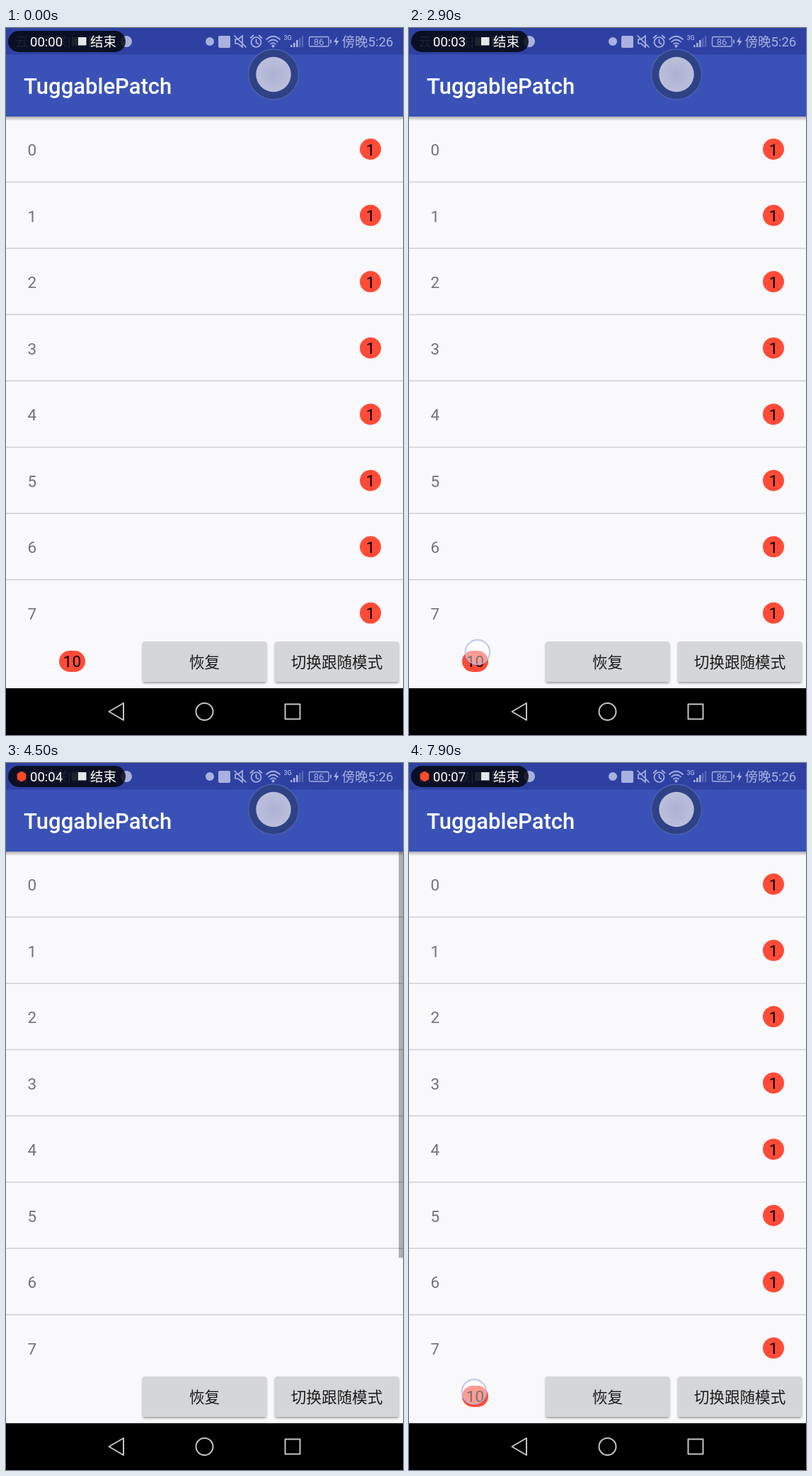
Recreate the animation shown at these times as an HTML page. Size 561 px wide and 998 px high, loop 8000 ms.

```html
<!DOCTYPE html>
<html lang="zh">
<head>
<meta charset="utf-8">
<title>TuggablePatch</title>
<style>
html, body { margin: 0; width: 100%; height: 100%; overflow: hidden; background: #000; }
svg { display: block; width: 561px; height: 998px; }
text { font-family: Roboto, "Noto Sans CJK SC", "Noto Sans CJK", sans-serif; }
.mid { text-anchor: middle; }
.num { font-size: 22.5px; }
.btn { font-size: 21.6px; font-weight: 500; fill: #1b1b1c; text-anchor: middle; }
.line { fill: none; stroke: #a8b1df; stroke-width: 1.7; stroke-linecap: round; }
.bar { font-size: 18.5px; }
.nav { fill: none; stroke: #c4c4c4; stroke-width: 2; stroke-linejoin: round; }
</style>
</head>
<body>
<svg viewBox="0 0 561 998">
  <defs>
    <linearGradient id="shade" x2="0" y2="1">
      <stop offset="0" stop-color="#000" stop-opacity=".3"/>
      <stop offset="1" stop-color="#000" stop-opacity="0"/>
    </linearGradient>
    <radialGradient id="ball">
      <stop offset="0" stop-color="#adb2d3"/>
      <stop offset="1" stop-color="#bbbfdb"/>
    </radialGradient>
    <filter id="lift" x="-5%" y="-10%" width="110%" height="130%">
      <feDropShadow dx="0" dy="2" stdDeviation="1.5" flood-color="#000" flood-opacity=".35"/>
    </filter>
  </defs>

  <rect width="561" height="932" fill="#f9f8fa"/>
  <g id="rows"></g>
  <g id="marks"></g>
  <rect id="scroll" x="555" y="125" width="6" height="573.5" fill="#000" opacity="0"/>

  <g fill="#d5d6d7">
    <rect x="193" y="866" width="175" height="57" rx="3" filter="url(#lift)"/>
    <rect x="380" y="866" width="175" height="57" rx="3" filter="url(#lift)"/>
  </g>
  <rect id="dimReset" x="193" y="866" width="175" height="57" rx="3" opacity="0"/>
  <rect id="dimMode" x="380" y="866" width="175" height="57" rx="3" opacity="0"/>
  <text class="btn" x="280.5" y="903">恢复</text>
  <text class="btn" x="467.5" y="903">切换跟随模式</text>

  <rect y="125" width="561" height="6" fill="url(#shade)"/>
  <rect y="37" width="561" height="88" fill="#3a52b7"/>
  <rect width="561" height="37.5" fill="#2e41a2"/>
  <text x="25" y="93" font-size="31" font-weight="500" fill="#fff">TuggablePatch</text>

  <g fill="#a8b1df">
    <text class="bar" x="13" y="26">云禾讯联|</text>
    <rect x="93" y="13" width="11" height="12"/>
    <rect x="117" y="12" width="17" height="14"/>
    <circle cx="170" cy="19" r="8"/>
    <circle cx="288" cy="19" r="6"/>
    <rect x="300" y="11" width="17" height="17" rx="2"/>
    <path d="M402 27v-3h2.6v3zM406 27v-6h2.6v6zM410 27v-10h2.6v10z"/>
    <path d="M414 27v-13h2.4v13zM418 27v-16h2.2v16z" opacity=".35"/>
    <path d="M468 12l-5 8h3.4l-1 6 5-8h-3.4z"/>
    <text x="392.5" y="17" font-size="9" font-weight="500">3G</text>
    <text class="mid" x="442" y="24" font-size="13">86</text>
    <text class="bar" x="474.5" y="26">傍晚5:26</text>
    <circle cx="377.500" cy="25.500" r="2"/>
  </g>
  <g class="line">
    <path d="M324 16h4l6-5v16l-6-5h-4zM323 11l16 16"/>
    <circle cx="353.5" cy="20" r="7"/>
    <path d="M353.500 16v4.500l3 2M345.500 14l4-3.500M361.500 14l-4-3.500"/>
    <path d="M368 16q9.500-8.500 19 0M371 19.500q6.500-6 13 0M374 22.700q3.500-3 7 0"/>
    <rect x="428.500" y="12.500" width="27.500" height="13.500" rx="1.500" stroke-width="1.300"/>
    <path d="M459 17v4"/>
  </g>

  <rect x="3" y="4" width="166" height="30" rx="15" fill="#04060c" opacity=".84"/>
  <path id="dot" d="M22 11.500l6.300 3.700v7.600l-6.300 3.700l-6.300-3.700v-7.600z" fill="#ff4a2b"/>
  <text id="clock" class="bar" x="34" y="26" fill="#fff">00:00</text>
  <rect x="102" y="13" width="11.500" height="11.500" fill="#e6e6e8"/>
  <text class="bar" x="119" y="26" fill="#fff">结束</text>

  <circle cx="378" cy="65.500" r="35.500" fill="#2f4286" stroke="#4a60b2" stroke-width="1.500"/>
  <circle cx="378" cy="65.500" r="24.700" fill="url(#ball)"/>

  <rect y="932" width="561" height="66"/>
  <g class="nav">
    <path d="M145.500 965l20.500-12v24z"/>
    <circle cx="280.500" cy="965" r="12"/>
    <rect x="394.500" y="954.500" width="21" height="21"/>
  </g>

  <path id="rope" fill="#ff4b38"/>
  <g id="badge">
    <rect x="-18.500" y="-15" width="37" height="30" rx="15" fill="#ff4b38"/>
    <text class="num mid" y="8">10</text>
  </g>
  <circle id="touch" r="17.300" fill="#fff" fill-opacity=".45" stroke="#aeb9e6" stroke-opacity=".8" stroke-width="2"/>
</svg>
<script>
const $ = id => document.getElementById(id);
const set = (id, attrs) => {
  for (const k in attrs) $(id).setAttribute(k, attrs[k]);
};

const HOME = [93.5, 894];
const RESET = [281, 897], MODE = [487, 897];
const TICKS = [900, 2100, 2900, 4000, 4900, 6200, 7300];
const DOT_ON = [400, 1400, 2500, 3300, 4400, 5500, 6600, 7700];

// Each key is [time, ...values].
const DRAG = [
  [1200, ...HOME], [1400, 105, 876], [1600, 126, 842], [1800, 148, 815], [1900, 170, 811],
  [2000, 160, 822], [2100, 86, 903], [2200, 96, 891], [2300, ...HOME],
  [2900, ...HOME], [3100, 118, 862], [3400, 228, 716], [3700, 348, 562], [3900, 370, 537]
];
const SCROLL = [[4200, 0], [4300, .3], [7500, .3], [7700, 0]];
const DIM_RESET = [[5500, 0], [5700, .1], [5900, .1], [6100, .07], [6300, 0]];
const DIM_MODE = [
  [2200, 0], [2300, .1], [2400, .1], [2600, 0],
  [6500, 0], [6600, .1], [6800, .1], [7100, .01], [7200, 0]
];
// [down, up, fixed point]; without a point the touch follows the badge.
const TOUCHES = [
  [1200, 1900], [2300, 2400, MODE], [2900, 4100],
  [5600, 5800, RESET], [6500, 6700, MODE], [7800, 8000]
];

const between = (t, a, b) => t >= a && t < b;

function at(keys, t) {
  const i = keys.findIndex(k => k[0] > t);
  if (i < 0) return keys[keys.length - 1].slice(1);
  if (i === 0) return keys[0].slice(1);
  const [a, b] = [keys[i - 1], keys[i]];
  const p = (t - a[0]) / (b[0] - a[0]);
  return a.slice(1).map((v, j) => v + (b[j + 1] - v) * p);
}

const badgeAt = t => t < 4200 ? at(DRAG, t) : HOME;

function ropePath([x, y]) {
  const [hx, hy] = HOME;
  const dx = x - hx, dy = y - hy, d = Math.hypot(dx, dy);
  if (d < 1) return "";
  const r = 15 - d * .06, R = 15;
  const nx = -dy / d, ny = dx / d;
  const p = (cx, cy, k) => `${cx + nx * k} ${cy + ny * k}`;
  const mx = (x + hx) / 2, my = (y + hy) / 2;
  return `M${p(hx, hy, r)}Q${p(mx, my, 2.5)} ${p(x, y, R)}` +
    `L${p(x, y, -R)}Q${p(mx, my, -2.5)} ${p(hx, hy, -r)}` +
    `A${r} ${r} 0 0 1 ${p(hx, hy, r)}Z`;
}

function drawTouch(t) {
  const hit = TOUCHES.find(([a, b]) => between(t, a, b + 200));
  if (!hit) return set("touch", { opacity: 0 });
  const [, up, spot] = hit;
  const [x, y] = spot || badgeAt(Math.min(t, up - 60) + 40).map((v, i) => v - [1.5, 6.5][i]);
  set("touch", { cx: x, cy: y, opacity: t <= up ? 1 : .4 });
}

function draw(ms) {
  const t = Math.floor(ms % 8000 / 100) * 100;
  const sec = TICKS.filter(k => k <= t).length;
  const lastTick = sec ? TICKS[sec - 1] : 0;
  $("clock").textContent = "00:0" + sec;
  set("dot", { opacity: DOT_ON.some(k => k <= t && k >= lastTick) ? 1 : 0 });

  const pos = badgeAt(t);
  set("badge", { transform: `translate(${pos})`, opacity: between(t, 4200, 5900) ? 0 : 1 });
  set("rope", { d: between(t, 1200, 2100) ? ropePath(pos) : "" });
  set("marks", { opacity: between(t, 4300, 5900) ? 0 : 1 });
  set("scroll", { opacity: at(SCROLL, t)[0] });
  set("dimReset", { opacity: at(DIM_RESET, t)[0] });
  set("dimMode", { opacity: at(DIM_MODE, t)[0] });
  drawTouch(t);
}

for (let i = 0; i < 8; i++) {
  const y = 171 + i * 93.55;
  $("rows").innerHTML += `<text class="num" x="30.500" y="${y + 9}" fill="#737275">${i}</text>` +
    (i < 7 ? `<rect y="${y + 45.7}" width="561" height="1.500" fill="#d0cfd1"/>` : "");
  $("marks").innerHTML += `<circle cx="515" cy="${y}" r="15" fill="#ff4b38"/>` +
    `<text class="num mid" x="515" y="${y + 8.5}">1</text>`;
}

const start = performance.now();
function frame() {
  draw(performance.now() - start);
  requestAnimationFrame(frame);
}
frame();
</script>
</body>
</html>
```
